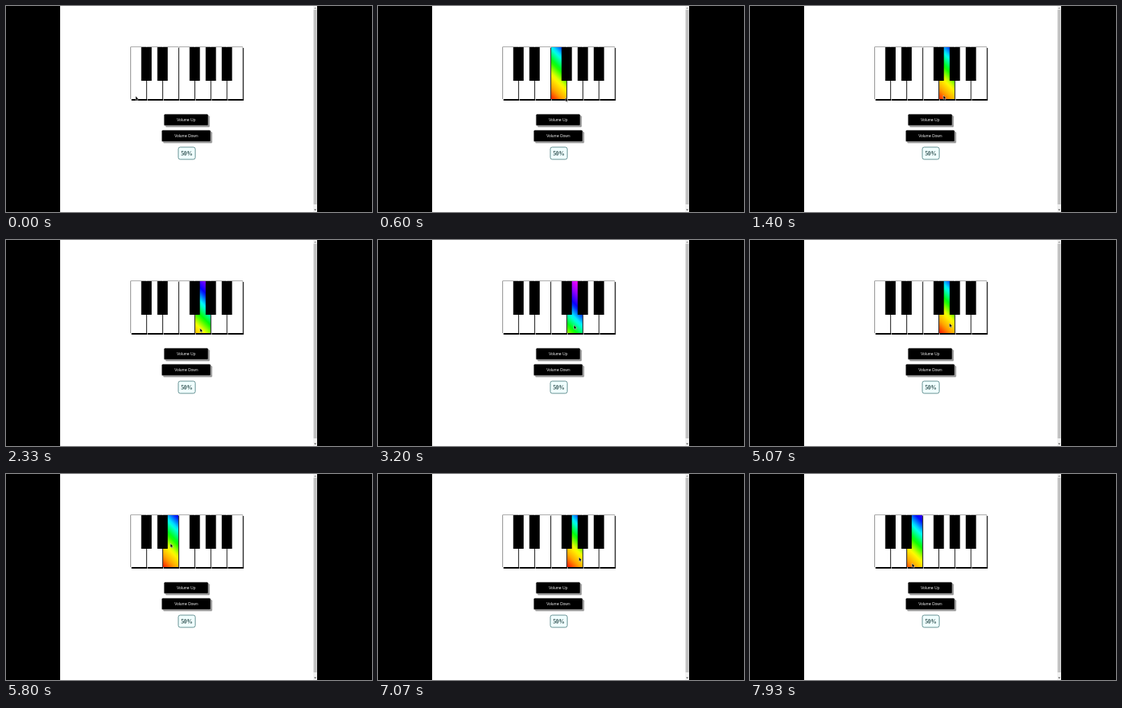
Recreate the animation shown at these times as an HTML page with a canvas. Size 480x270 px, loop 8000 ms.

```html
<!DOCTYPE html>
<html lang="en">
<head>
<meta charset="utf-8">
<title>Piano</title>
<style>
  html, body { margin: 0; width: 480px; height: 270px; overflow: hidden; background: #000; }
  canvas { display: block; }
</style>
</head>
<body>
<canvas width="480" height="270"></canvas>
<script>
const ctx = document.querySelector('canvas').getContext('2d');
const LOOP = 8000, STEP = 200 / 3;
const TOP = 54, PITCH = 21.1, LEFT = 163.6, KEY_W = 20.2, KEY_H = 68;
const BLACK_SLOTS = [0, 1, 3, 4, 5], BLACK_W = 13.6, BLACK_H = 44;
const HUES = [0, 38, 60, 120, 180, 240, 275, 300, 360];

// Pointer path: time, x, y
const PATH = [
  [0, 170, 118], [333, 203, 121], [867, 288.5, 119], [1000, 309, 48],
  [1067, 303, 100], [1133, 274, 139], [1200, 274, 139], [1267, 258, 121],
  [1400, 253.5, 117], [2200, 254, 116], [3200, 257, 111.5], [3267, 258, 108],
  [3333, 268, 92], [3400, 284, 88], [3533, 268, 90], [3667, 219, 90],
  [3733, 206, 87], [3867, 206, 87], [3933, 205, 87], [4067, 205, 87],
  [4200, 199.5, 88], [4333, 208, 88], [4600, 258, 88], [4733, 292, 88],
  [4800, 292, 88], [4933, 280, 100], [5000, 267, 107], [5067, 261.5, 109],
  [5400, 260, 98], [5600, 234, 68], [5667, 227, 48], [5800, 215.5, 91],
  [5933, 205, 90], [6000, 205, 90], [6067, 199.5, 90], [6533, 292.5, 90],
  [6800, 292.5, 90], [6933, 278, 104], [7067, 263.5, 109], [7400, 260, 112],
  [7600, 220, 115], [7933, 212.5, 117], [8000, 212.5, 117]
];

const mix = (a, b, k) => a + (b - a) * k;
const keyX = i => LEFT + PITCH * i;
const blackX = i => 177.4 + PITCH * i;

function pointerAt(t) {
  const i = Math.max(1, PATH.findIndex(p => p[0] >= t));
  const [t0, x0, y0] = PATH[i - 1], [t1, x1, y1] = PATH[i];
  const k = (t - t0) / (t1 - t0);
  return [mix(x0, x1, k), mix(y0, y1, k)];
}

// Index of the hovered white key, or -1
function hoveredKey(t) {
  if (t < 60) return -1;
  const [x, y] = pointerAt(t);
  const i = Math.floor((x - LEFT) / PITCH);
  if (y < TOP || y > 124 || i < 0 || i > 6) return -1;
  const onBlack = y < TOP + BLACK_H &&
    BLACK_SLOTS.some(s => x >= blackX(s) && x <= blackX(s) + BLACK_W);
  return onBlack ? -1 : i;
}

function hoverTime(t, key) {
  let start = t;
  while (start > 60 && hoveredKey(start - 10) === key) start -= 10;
  return t - start;
}

function rainbow(x, shift) {
  const cx = x + KEY_W / 2, cy = TOP + KEY_H / 2, a = (KEY_W + KEY_H) / 4;
  const gradient = ctx.createLinearGradient(cx - a, cy + a, cx + a, cy - a);
  for (let n = 0; n <= 20; n++) {
    const p = (n / 4 + shift) % 8, i = Math.floor(p);
    gradient.addColorStop(n / 20, `hsl(${mix(HUES[i], HUES[i + 1], p - i)} 100% 50%)`);
  }
  return gradient;
}

function rect(color, x, y, w, h) {
  ctx.fillStyle = color;
  ctx.fillRect(x, y, w, h);
}

function box(x, y, w, h, r, fill, stroke, line) {
  ctx.beginPath();
  ctx.roundRect(x, y, w, h, r);
  ctx.fillStyle = fill;
  ctx.fill();
  if (!stroke) return;
  ctx.strokeStyle = stroke;
  ctx.lineWidth = line;
  ctx.stroke();
}

function text(label, x, y, font, color) {
  ctx.font = font;
  ctx.fillStyle = color;
  ctx.textAlign = 'center';
  ctx.fillText(label, x, y);
}

function shape(points, fill) {
  ctx.beginPath();
  points.forEach(([x, y]) => ctx.lineTo(x, y));
  ctx.closePath();
  ctx.fillStyle = fill;
  ctx.fill();
}

function button(label, x, y, w) {
  box(x + 2, y + 2, w, 15, 1.5, '#999');
  box(x, y, w, 15, 1.5, '#000', '#ccc', 0.5);
  text(label, x + w / 2, y + 9.3, '5px "Liberation Sans", Arial, sans-serif', '#eee');
}

function page() {
  rect('#000', 0, 0, 480, 270);
  rect('#fff', 71, 0, 337, 270);
  rect('#f1f1f1', 403, 0, 5, 270);
  rect('#c1c1c1', 403.5, 5, 4, 255);
  shape([[404, 3.5], [405.5, 1.7], [407, 3.5]], '#888');
  shape([[404, 266.5], [405.5, 268.3], [407, 266.5]], '#444');
  button('Volume Up', 207.2, 141.7, 58);
  button('Volume Down', 204.2, 162.7, 64.2);
  box(226, 185, 22.2, 16, 2.5, '#f0ffff', '#3f7476', 0.8);
  text('50%', 237, 196, 'bold 7.6px "Liberation Serif", Times, serif', '#2f4f4f');
}

function piano(t) {
  const lit = hoveredKey(t);
  for (let i = 0; i < 7; i++) {
    const x = keyX(i);
    rect('#000', x + 1, TOP + 1, KEY_W + 0.3, 69);
    rect('#555', x - 0.3, TOP - 0.5, KEY_W + 0.5, KEY_H + 0.5);
    rect(i === lit ? rainbow(x, hoverTime(t, i) * 0.0012) : '#fff',
      x + 0.3, TOP, KEY_W - 0.3, KEY_H);
  }
  BLACK_SLOTS.forEach(s => rect('#000', blackX(s), TOP, BLACK_W, BLACK_H));
}

function pointer(t) {
  ctx.save();
  ctx.translate(...pointerAt(t));
  shape([[0, 0], [0, 5.5], [1.3, 4.4], [2.2, 6.2], [3, 5.8], [2.2, 4.1], [3.8, 4]], '#000');
  ctx.strokeStyle = '#fff';
  ctx.lineWidth = 0.4;
  ctx.stroke();
  ctx.restore();
}

function draw(now) {
  const t = Math.floor(((now % LOOP) + 4) / STEP) * STEP % LOOP;
  page();
  piano(t);
  pointer(t);
  requestAnimationFrame(draw);
}
requestAnimationFrame(draw);
</script>
</body>
</html>
```
